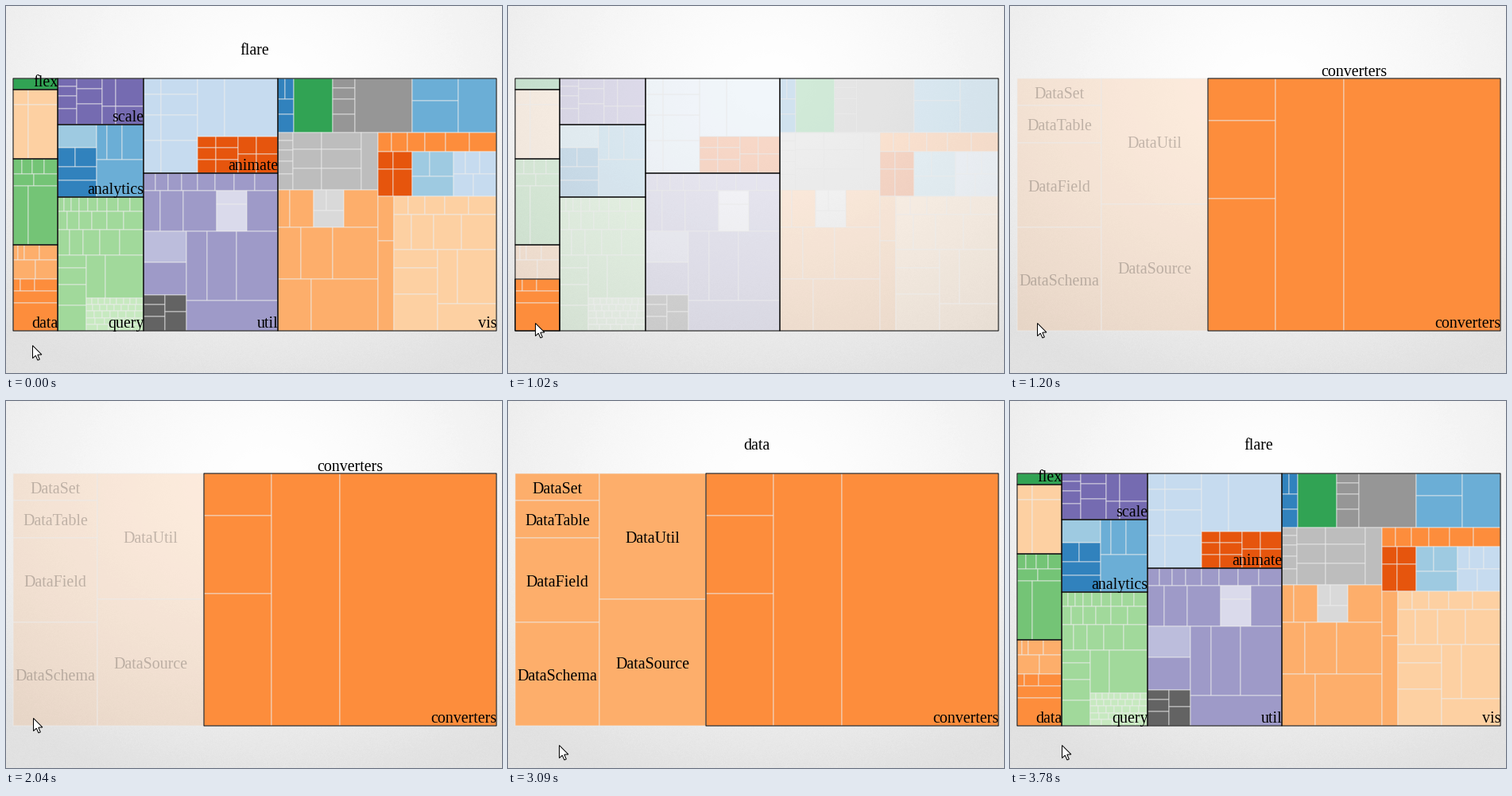
Recreate the animation shown at these times as a matplotlib script. Size 624 by 461 pixels, loop 4.53 s.

```python
import numpy as np
import matplotlib.pyplot as plt
from matplotlib.animation import FuncAnimation
from matplotlib.collections import PolyCollection
from matplotlib.colors import to_rgb
from matplotlib.patches import FancyBboxPatch, Polygon, Rectangle

W, H, DPI = 624, 461, 100
STEP, LOOP = 30, 4530
PT = 72 / DPI
DIM = 0.22
STAGE = (9, 91, 617, 408)

# moments of the loop, in ms
HOVER, CLICK, ZOOM, OVER_DATA, LEAVE, BACK, DONE = 390, 810, 1080, 2130, 2970, 3570, 3780

BLUE, SKY, PALE_SKY, ICE = "#3182bd", "#6baed6", "#9ecae1", "#c6dbef"
RUST, ORANGE, PEACH, CREAM = "#e6550d", "#fd8d3c", "#fdae6b", "#fdd0a2"
GREEN, LEAF, MINT, PALE_MINT = "#31a354", "#74c476", "#a1d99b", "#c7e9c0"
VIOLET, LILAC, MAUVE, MIST = "#756bb1", "#9e9ac8", "#bcbddc", "#dadaeb"
COAL, GREY, SILVER, ASH = "#636363", "#969696", "#bdbdbd", "#d9d9d9"

boxes, colors, groups = [], [], []


def strips(box, weights, counts, columns=False):
    """Share a box among weights, in strips that hold the given counts."""
    if columns:
        turned = strips(np.take(box, [1, 0, 3, 2]), weights, counts)
        return turned[:, [1, 0, 3, 2]]
    x0, y, x1, y1 = box
    scale = (y1 - y) / np.sum(weights)
    cells = []
    for part in np.split(np.asarray(weights), np.cumsum(counts)[:-1]):
        bottom = y + scale * part.sum()
        xs = x0 + (x1 - x0) * np.append(0, np.cumsum(part)) / part.sum()
        cells += [(a, y, b, bottom) for a, b in zip(xs, xs[1:])]
        y = bottom
    return np.round(cells)


# Each layout helper returns a function that fills the box it is given.
def rows(color, *counts, columns=False):
    def place(box):
        n = sum(counts)
        boxes.extend(strips(box, np.geomspace(1, 2, n), counts, columns))
        colors.extend([to_rgb(color)] * n)
    return place


def cols(color, *counts):
    return rows(color, *counts, columns=True)


def across(x, left, right):
    def place(box):
        x0, y0, x1, y1 = box
        left((x0, y0, x, y1))
        right((x, y0, x1, y1))
    return place


def down(y, top, bottom):
    def place(box):
        x0, y0, x1, y1 = box
        top((x0, y0, x1, y))
        bottom((x0, y, x1, y1))
    return place


def group(name, inside):
    def place(box):
        groups.append((name, box))
        inside(box)
    return place


# The data package: the same weights give its small and its zoomed layout.
NAMES = ["DataSet", "DataTable", "DataField", "DataSchema", "DataUtil", "DataSource"]
WEIGHTS = [36, 50, 112, 138, 212, 213, 45, 83, 141, 273, 624]
COUNTS = [4, 2, 3, 1, 1]
N_LEAF, N_DATA = len(NAMES), len(WEIGHTS)
zoomed = strips(STAGE, WEIGHTS, COUNTS, columns=True)


def data_cells(box):
    boxes[:0] = strips(box, WEIGHTS, COUNTS)
    colors[:0] = [to_rgb(PEACH)] * N_LEAF + [to_rgb(ORANGE)] * (N_DATA - N_LEAF)


flex = group("flex", rows(GREEN, 1))
display = group("", down(124, rows(CREAM, 2), rows(CREAM, 2)))
physics = group("", down(226, rows(LEAF, 4, 2), rows(LEAF, 2)))
data = group("data", data_cells)

scale = group("scale", across(
    121, across(89, cols(VIOLET, 4), cols(VIOLET, 3)),
    down(126, rows(VIOLET, 2), rows(VIOLET, 2))))
analytics = group("analytics", across(
    114, down(178, rows(PALE_SKY, 1), rows(BLUE, 2, 1, 1)),
    down(193, rows(SKY, 3), rows(SKY, 1))))
query = group("query", down(
    313, down(258, rows(MINT, 9), down(281, rows(MINT, 6), rows(MINT, 5))),
    across(101, cols(MINT, 4),
           down(367, rows(MINT, 2), rows(PALE_MINT, 9, 8, 7, 6, 5)))))

animate = group("animate", across(
    241, across(195, cols(ICE, 4), cols(ICE, 4)),
    down(164, rows(ICE, 2), cols(RUST, 3, 3, 2, 2))))
util = group("util", down(
    283,
    down(232, rows(LILAC, 8),
         across(265, rows(LILAC, 3), across(303, cols(MIST, 2), rows(LILAC, 1)))),
    across(227,
           down(322, rows(MAUVE, 1), down(363, rows(LILAC, 1), cols(COAL, 3, 2))),
           down(370, rows(LILAC, 3), rows(LILAC, 1)))))

vis_top = across(362, rows(BLUE, 2, 1, 1), across(
    411, rows(GREEN, 1), across(
        511, across(439, cols(GREY, 4), rows(GREY, 1)), cols(SKY, 2, 1))))
vis_left = down(
    231, across(361, cols(SILVER, 5), cols(SILVER, 3, 3, 1)),
    down(278,
         across(387, rows(PEACH, 2), across(425, rows(ASH, 2, 1), rows(PEACH, 1))),
         down(343, rows(PEACH, 3), rows(PEACH, 2))))
vis_right = down(183, rows(ORANGE, 6), down(
    239,
    across(511, rows(RUST, 2, 2), across(563, rows(PALE_SKY, 2, 1), rows(ICE, 3, 2))),
    across(488, cols(PEACH, 2), down(
        306, down(262, rows(CREAM, 5), rows(CREAM, 4)),
        across(543, cols(CREAM, 3), down(374, rows(CREAM, 2), rows(CREAM, 1)))))))
vis = group("vis", down(159, vis_top, across(468, vis_left, vis_right)))

flare = across(
    65, down(105, flex, down(192, display, down(300, physics, data))),
    across(173, down(149, scale, down(240, analytics, query)),
           across(342, down(210, animate, util), vis)))
flare(STAGE)

boxes, colors = np.array(boxes, float), np.array(colors)


def span(cells):
    """The box around the converters, the last part of the data cells."""
    return (*cells[N_LEAF, :2], *cells[N_DATA - 1, 2:])


CONV_SMALL, CONV_BIG = span(boxes), span(zoomed)
ITEMS = ["GraphMLConv…", "DelimitedTextC…", "JSONConverter", "IDataConverter", "Converters"]

fig = plt.figure(figsize=(W / DPI, H / DPI), dpi=DPI)
ax = fig.add_axes([0, 0, 1, 1])
ax.set(xlim=(0, W), ylim=(H, 0))
ax.axis("off")

yy, xx = np.mgrid[0:H, 0:W]
dist = np.hypot((xx - 330) / 440, (yy - 100) / 340)
grain = np.random.default_rng(4).normal(0, 1, (H, W)) * np.clip(dist, 0, 1)
paper = np.clip(254 - 24 * np.minimum(dist, 1.15) ** 1.5 + grain, 0, 255)
ax.imshow(paper, cmap="gray", vmin=0, vmax=255, extent=(0, W, H, 0),
          aspect="auto", interpolation="nearest")

# unsnapped, so lines between pixels stay soft
cell_art = PolyCollection([], linewidths=PT, snap=False, zorder=1)
border_art = PolyCollection([], facecolors="none", edgecolors="black",
                            linewidths=PT, snap=False, zorder=3)
ARROW = np.array([(0, 0), (0, 16), (3.8, 12.6), (6.4, 18.4), (8.8, 17.4),
                  (6.3, 11.6), (11.4, 11.4)])
cursor = Polygon(ARROW, fc="white", ec="black", lw=PT, zorder=9)
ax.add_collection(cell_art, autolim=False)
ax.add_collection(border_art, autolim=False)
ax.add_patch(cursor)
temp = []


def text(x, y, s, size=20, ha="center", alpha=1, z=4, font="Liberation Serif", color="black"):
    temp.append(ax.text(x, y, s, fontsize=size * PT, ha=ha, va="baseline",
                        alpha=alpha, zorder=z, family=font, color=color))


def title(s, box=STAGE, y=61):
    text((box[0] + box[2]) / 2, y, s)


def corner_label(box, name):
    text(box[2] + 0.5, box[3] - 4, name, ha="right")


def patch(p):
    temp.append(ax.add_patch(p))


def corners(b):
    x0, y0, x1, y1 = np.asarray(b, float).T
    return np.stack([np.stack(c, -1) for c in
                     ((x0, y0), (x1, y0), (x1, y1), (x0, y1))], axis=-2)


def ease(u):
    u = min(max(u, 0), 1)
    return 4 * u ** 3 if u < 0.5 else 1 - 4 * (1 - u) ** 3


def rounded(x, y, w, h, color, alpha, grow=0):
    patch(FancyBboxPatch((x - grow, y - grow), w + 2 * grow, h + 2 * grow,
                         boxstyle=f"round,pad=0,rounding_size={10 + grow}",
                         fc=color, ec="none", alpha=alpha, zorder=5))


def popup(a):
    x, y, w, line = 192, 257, 150, 16
    for grow in range(5):
        rounded(x + 2, y + 2, w, 100, "black", 0.09 * a, grow)
    rounded(x, y, w, 100, "white", a)
    for i, item in enumerate(ITEMS):
        top = y + 10 + line * i
        patch(Rectangle((x, top), w, line, fc="#fec59d" if i else ORANGE,
                        ec="none", alpha=a, zorder=6))
        text(x + 10, top + 13, f"{i + 1}. {item}", 14, "left", a, 7,
             "Liberation Sans", "#8f8781" if i else "black")
    # the ranks, written on the cells themselves
    for rank, cell in enumerate(boxes[N_DATA - 1:N_LEAF:-1][:4], 1):
        size = max(20 - 5 * (rank - 1), 10)
        text((cell[0] + cell[2]) / 2, (cell[1] + cell[3]) / 2 + 0.4 * size,
             rank, size, alpha=a if rank == 1 else 0.22 * a)


def draw(frame):
    t = frame * STEP
    while temp:
        temp.pop().remove()

    fade = np.interp(t, [360, 480, 2100, 2250], [1, DIM, DIM, 1])
    zoom_view = ZOOM <= t < BACK
    if zoom_view:
        k = ease(0.308 + 0.692 * (t - 1110) / 90)
    elif t >= BACK:
        k = 1 - ease((t - BACK) / (DONE - BACK))
    else:
        k = 0

    b = boxes.copy()
    b[:N_DATA] += k * (zoomed - b[:N_DATA])
    alpha = np.full(len(b), fade)
    alpha[N_LEAF:N_DATA] = 1
    shown = np.ones(len(b))
    shown[N_DATA:] = 0 if zoom_view else 1 - k
    keep = shown > 0
    line = 0.7 if k in (0, 1) else 0  # cells move without their outlines
    edge = np.column_stack([np.full((len(b), 3), 0.93), line * shown])
    cell_art.set_verts(corners(b[keep]))
    cell_art.set_facecolor(np.column_stack([colors, alpha * shown])[keep])
    cell_art.set_edgecolor(edge[keep])

    if zoom_view:
        borders = [CONV_BIG]
        for name, now, end in zip(NAMES, b, zoomed):
            text(now[0] + (end[2] - end[0]) / 2,
                 now[1] + (end[3] - end[1]) / 2 + 7.5, name, alpha=fade)
        if t < OVER_DATA:
            title("converters", CONV_BIG, 88)
        elif t < LEAVE:
            title("data", y=88)
            borders.append(STAGE)
        else:
            title("data")
        if not OVER_DATA <= t < LEAVE:
            corner_label(CONV_BIG, "converters")
    else:
        borders = [box for _, box in groups]
        if HOVER <= t < ZOOM:
            borders.append(CONV_SMALL)
        else:
            title("flare")
            for name, box in groups:
                corner_label(box, name)
    border_art.set_verts(corners(borders))

    shade = np.interp(t, [HOVER, 480, CLICK, CLICK + 120], [0, 1, 1, 0])
    if shade > 0:
        popup(shade)

    times = [300, 420, 480, 630, 2040, 2250, 2790, 3090, 3390, 3780]
    cx = np.interp(t, times, [33, 33, 33, 34, 34, 50, 50, 64, 64, 65])
    cy = np.interp(t, times, [426, 406, 406, 398, 398, 371, 371, 432, 432, 432])
    cursor.set_xy(ARROW + np.round([cx, cy]) + 0.5)
    return []


anim = FuncAnimation(fig, draw, frames=LOOP // STEP, interval=STEP, repeat=True,
                     repeat_delay=0, cache_frame_data=False, init_func=lambda: [])
plt.show()
```
